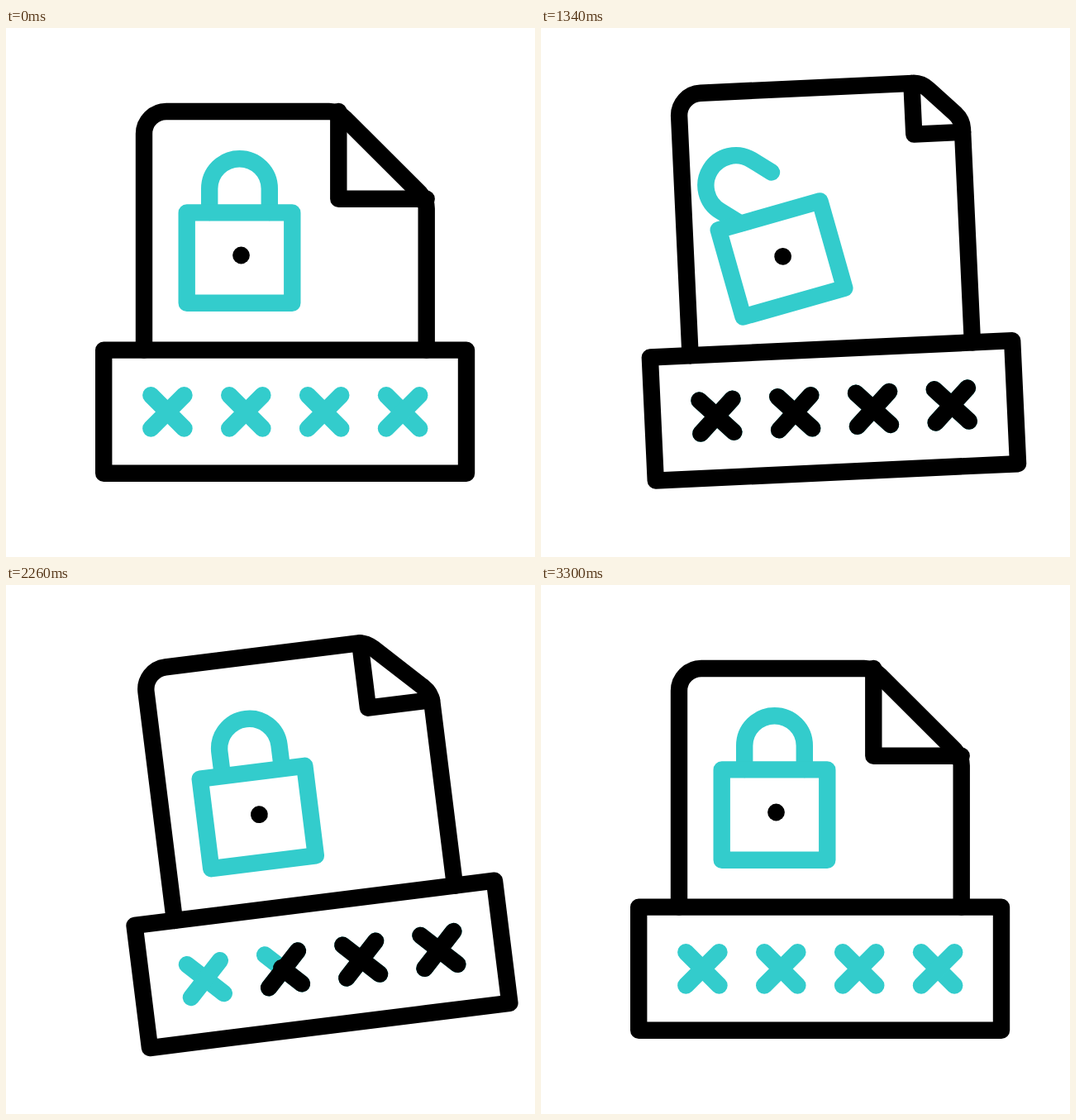
An HTML page for the animation above (3.6 s loop, 640 by 640 pixels).

```html
<!DOCTYPE html>
<html lang="en">
<head>
<meta charset="utf-8">
<title>Locked document</title>
<style>
  html, body { margin: 0; width: 100%; height: 100%; overflow: hidden; background: #fff; }
  svg { display: block; width: 100%; height: 100%; }
  path, rect { fill: none; stroke: #000; stroke-width: 20.4; stroke-linecap: round; stroke-linejoin: round; }
  .teal { stroke: #3cc; }
</style>
</head>
<body>
<svg viewBox="0 0 640 640">
  <g id="scene">
    <path id="page"/>
    <path id="fold"/>
    <rect x="118.2" y="389.6" width="438.8" height="149.2"/>
    <g id="marks"></g>
    <g id="rays"></g>
    <g id="lock">
      <path id="shackle" class="teal" d="M246.2 223V194.5a36.3 36.3 0 0 1 72.6 0V223"/>
      <rect class="teal" x="218.7" y="223.4" width="127.6" height="109.4"/>
    </g>
    <circle cx="284.5" cy="275" r="10.4"/>
  </g>
</svg>
<script>
const LOOP = 3600;
const $ = id => document.getElementById(id);

// Cubic easing with y handles at 0 and 1; x handles are x1 and x2.
function ease(u, x1 = 1 / 3, x2 = 2 / 3) {
  let lo = 0, hi = 1;
  for (let i = 0; i < 24; i++) {
    const s = (lo + hi) / 2, r = 1 - s;
    if (3 * r * r * s * x1 + 3 * r * s * s * x2 + s ** 3 < u) lo = s;
    else hi = s;
  }
  return lo * lo * (3 - 2 * lo);
}

const span = (t, from, to) => Math.min(1, Math.max(0, (t - from) / (to - from)));
const mix = (a, b, k) => a + (b - a) * k;

// Each key: time, value, optional easing handles for the way in.
function track(keys, t) {
  if (t <= keys[0][0]) return keys[0][1];
  for (let i = 1; i < keys.length; i++) {
    const [time, value, x1, x2] = keys[i];
    if (t < time) {
      const [from, start] = keys[i - 1];
      return mix(start, value, ease(span(t, from, time), x1, x2));
    }
  }
  return keys[keys.length - 1][1];
}

const SWING = [[630, 0], [1070, -8.75], [1090, -8.75], [1738, 9.5], [2380, -8.75], [3300, 0, 0.45, 0.06]];
const RISE = [[525, 0], [1010, 1], [1900, 1], [2740, 0]];
const OPEN = [[1040, 0], [1400, 1], [1480, 1], [1800, 0]];
const RAY_TIP = [[1640, 0], [1840, 1]];
const RAY_ROOT = [[1930, 0], [2160, 1]];

function addPath(parent, cls) {
  const el = document.createElementNS("http://www.w3.org/2000/svg", "path");
  if (cls) el.setAttribute("class", cls);
  parent.append(el);
  return el;
}

// Shows the part of a straight line between fractions a and b.
function trim(el, [x1, y1, x2, y2], a, b) {
  const at = k => mix(x1, x2, k) + " " + mix(y1, y2, k);
  el.setAttribute("d", b > a ? `M${at(a)}L${at(b)}` : "");
}

const strokes = [];
for (let i = 0; i < 4; i++) {
  const x = 195.4 + 94.9 * i, y = 464.4, r = 20.1;
  const lines = [[x - r, y - r, x + r, y + r], [x + r, y - r, x - r, y + r]];
  lines.forEach(line => trim(addPath($("marks"), "teal"), line, 0, 1));
  lines.forEach(line => strokes.push({ line, el: addPath($("marks")) }));
}

const rays = [
  [340.8, 175.8, 349.6, 129.5],
  [371, 193.5, 428.1, 147.6],
  [388.6, 232.7, 450.5, 228.7]
].map(line => ({ line, el: addPath($("rays"), "teal") }));

function drawPage(p) {
  const top = 101 - 28 * p;
  const cutX = 401.5 + 60 * p, cutY = 208 - 88 * p;
  const foldX = 402.3 + 47.5 * p, foldY = 206.8 - 72 * p;
  $("page").setAttribute("d",
    `M167 389.6V${top + 27}Q167 ${top} 194 ${top}`.replace("Q167 " + top, "A27 27 0 0 1") +
    `H${cutX - 10.5}Q${cutX} ${top} ${cutX + 8.5} ${top + 8.5}` +
    `L${500.2} ${cutY - 8.5}Q508.7 ${cutY} 508.7 ${cutY + 10.5}V389.6`);
  $("fold").setAttribute("d", `M${foldX} ${top}V${foldY}H508.7`);
}

function draw(t) {
  const open = track(OPEN, t);
  $("scene").setAttribute("transform", `rotate(${track(SWING, t)} 317 100)`);
  $("lock").setAttribute("transform", `rotate(${-14.2 * open} 282.5 277)`);
  $("shackle").setAttribute("transform", `rotate(${-46 * open} 246.2 223)`);
  drawPage(track(RISE, t));
  strokes.forEach(({ line, el }, i) => {
    const on = 110 + 80 * i, off = 2065 + 80 * i;
    trim(el, line, span(t, off, off + 80), span(t, on, on + 80));
  });
  const root = track(RAY_ROOT, t), tip = track(RAY_TIP, t);
  rays.forEach(({ line, el }) => trim(el, line, root, tip));
}

const start = performance.now();
function tick() {
  draw((performance.now() - start) % LOOP);
  requestAnimationFrame(tick);
}
tick();
</script>
</body>
</html>
```
